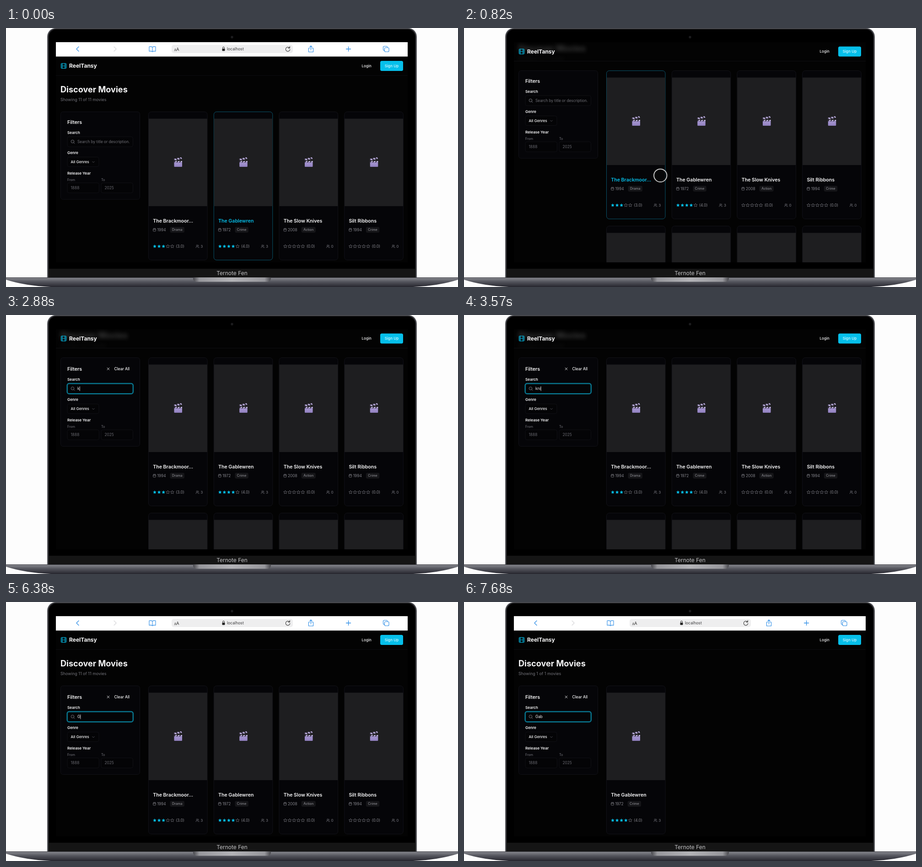
Recreate the animation shown at these times as an HTML page with a canvas. Size 988 by 567 pixels, loop 8 s.

```html
<!DOCTYPE html>
<html lang="en">
<head>
<meta charset="utf-8">
<title>Movie search</title>
<style>
html, body { margin: 0; width: 100%; height: 100%; overflow: hidden; background: #fdfdfd; }
canvas { display: block; }
</style>
</head>
<body>
<canvas id="stage" width="988" height="567"></canvas>
<script>
const ctx = document.getElementById('stage').getContext('2d');
const LOOP = 8000;
const CYAN = '#06bfea', BLUE = '#2f8ee6', WHITE = '#f7f7f8', GREY = '#7d7d84', DIM = '#5c5c63';
const SCREEN = { x: 109, y: 31, w: 769, h: 482 };

const MOVIES = [
  { title: 'The Brackmoor…', year: 1994, genre: 'Drama', stars: 3, votes: 3 },
  { title: 'The Gablewren', year: 1972, genre: 'Crime', stars: 4, votes: 3 },
  { title: 'The Slow Knives', year: 2008, genre: 'Action', stars: 0, votes: 0 },
  { title: 'Silt Ribbons', year: 1994, genre: 'Crime', stars: 0, votes: 0 }
];

// Timeline: [start, value] steps, the last one reached applies.
const TYPED = [[0, ''], [2880, 'k'], [3090, 'kn'], [3260, 'kni'], [5010, 'kn'], [5180, 'k'],
  [5350, ''], [6340, 'G'], [6860, 'Ga'], [7060, 'Gab']];
const CARET = [[0, 0], [1440, 1], [1990, 0], [2500, 1], [3790, 0], [5350, 1], [5900, 0], [6340, 1], [7570, 0]];
const FOUND = [[0, -1], [3600, 2], [5660, -1], [7340, 1]];
const POINTER = [[0, 468, 331], [200, 462, 330], [580, 437, 328], [860, 428, 322], [1230, 236, 163], [1500, 240, 163]];

const clamp = v => Math.max(0, Math.min(1, v));
const smooth = p => p * p * (3 - 2 * p);
const stepAt = (list, t) => list.filter(s => s[0] <= t).pop()[1];

function pointerAt(t) {
  const i = POINTER.findIndex(p => p[0] > t);
  if (i < 0) return POINTER[POINTER.length - 1].slice(1);
  const [t0, x0, y0] = POINTER[i - 1], [t1, x1, y1] = POINTER[i];
  const p = (t - t0) / (t1 - t0), k = t0 === 860 ? smooth(p) : p;
  return [x0 + (x1 - x0) * k, y0 + (y1 - y0) * k];
}

function scrollAt(t) {
  if (t < 3600) return 90 * smooth(clamp((t - 371) / 449));
  return 90 * Math.pow(1 - clamp((t - 3600) / 360), 3);
}

// y is the middle of the capitals.
function text(str, x, y, size, color, weight = 400, align = 'left') {
  ctx.font = `${weight} ${size}px Inter, sans-serif`;
  ctx.textAlign = align;
  ctx.fillStyle = color;
  ctx.fillText(str, x, y + size * 0.36);
  return ctx.measureText(str).width;
}

function box(x, y, w, h, r, fill, stroke, width = 1) {
  ctx.beginPath();
  ctx.roundRect(x, y, w, h, r);
  if (fill) { ctx.fillStyle = fill; ctx.fill(); }
  if (stroke) { ctx.strokeStyle = stroke; ctx.lineWidth = width; ctx.stroke(); }
}

function path(d, x, y, color, width = 1, fill) {
  ctx.save();
  ctx.translate(x, y);
  const p = new Path2D(d);
  ctx.lineCap = ctx.lineJoin = 'round';
  ctx.lineWidth = width;
  if (fill) { ctx.fillStyle = fill; ctx.fill(p); }
  if (color) { ctx.strokeStyle = color; ctx.stroke(p); }
  ctx.restore();
}

function gradient(x0, y0, x1, y1, stops) {
  const g = ctx.createLinearGradient(x0, y0, x1, y1);
  stops.forEach(([p, c]) => g.addColorStop(p, c));
  return g;
}

function clipTo(x, y, w, h, draw) {
  ctx.save();
  ctx.beginPath();
  ctx.rect(x, y, w, h);
  ctx.clip();
  draw();
  ctx.restore();
}

function laptop() {
  ctx.fillStyle = '#fdfdfd';
  ctx.fillRect(0, 0, 988, 567);
  box(90, 0, 808, 550, [19, 19, 0, 0], '#55565b');
  box(92, 1.5, 804, 548, [17, 17, 0, 0], '#29292c');
  box(93.5, 3, 801, 546, [16, 16, 0, 0], '#000');
  ctx.fillStyle = '#151515';
  ctx.fillRect(93.5, 527, 801, 20);
  ctx.beginPath();
  ctx.arc(494, 20, 2.7, 0, 7);
  ctx.fillStyle = '#1c1c1e';
  ctx.fill();
  text('Ternote Fen', 494, 537, 12, '#c3c3c5', 400, 'center');

  const body = gradient(0, 546, 0, 567, [[0, '#85868c'], [0.2, '#73747b'], [0.45, '#54555d'], [1, '#26262e']]);
  path('M0 546H988V551Q948 564 890 567H98Q40 564 0 551Z', 0, 0, null, 0, body);
  ctx.fillStyle = '#3b3b41';
  ctx.fillRect(0, 546, 988, 1);
  box(409, 546, 170, 9.5, [0, 0, 7, 7],
    gradient(409, 0, 579, 0, [[0, '#47474c'], [0.08, '#97979c'], [0.5, '#b3b3b7'], [0.92, '#97979c'], [1, '#47474c']]));
}

function browserBar(dy) {
  const y = 46 - dy;
  ctx.fillStyle = '#fff';
  ctx.fillRect(109, 31 - dy, 769, 31.5);
  path('M2.5 -5L-2.5 0L2.5 5', 156.5, y, BLUE, 1.3);
  path('M-2.5 -5L2.5 0L-2.5 5', 238.5, y, '#d5d5d8', 1.1);
  path('M0 -4Q-3 -6 -7 -5V5Q-3 4 0 6Q3 4 7 5V-5Q3 -6 0 -4V6', 320, y, BLUE, 1.1);
  box(362, 37 - dy, 265, 18, 5, '#eeeeef');
  text('A', 367.5, y + 2, 7, '#333', 400);
  text('A', 372, y + 1, 9.5, '#333', 400);
  box(472.5, y - 0.8, 6, 5, 1, '#222');
  path('M-1.8 0V-2A1.8 1.8 0 0 1 1.8 -2V0', 475.5, y - 0.8, '#222', 1);
  text('localhost', 483, y, 8.6, '#3a3a3c');
  path('M3.8 -2.7A4.7 4.7 0 1 0 4.7 .8M4.3 -6V-2.4H.8', 616, y + 0.3, '#333', 1.1);
  path('M-2 -2H-5V6.5H5V-2H2M0 2.5V-7M-2.6 -4.4L0 -7L2.6 -4.4', 666.5, y, BLUE, 1.1);
  path('M-5 0H5M0 -5V5', 748.5, y, BLUE, 1.3);
  box(824.5, y - 6, 9, 9, 2, null, BLUE, 1.1);
  box(827.5, y - 3, 9.5, 9, 2, '#fff', BLUE, 1.1);
}

function heading(y, count) {
  text('Discover Movies', 119, 134 - y, 18.1, WHITE, 700);
  text(`Showing ${count} of ${count} movies`, 119, 157 - y, 9, '#74747b');
}

function header(dy, scroll, count) {
  const top = 62.5 - dy;
  clipTo(109, top, 769, 41.5, () => {
    ctx.fillStyle = '#030303';
    ctx.fillRect(109, top, 769, 42);
    ctx.save();
    ctx.filter = 'blur(5px)';
    ctx.globalAlpha = 0.24;
    heading(scroll, count);
    ctx.restore();
  });
  ctx.fillStyle = '#0f0f12';
  ctx.fillRect(109, top + 41, 769, 1);
  const y = top + 20.5;
  box(120.5, y - 5.5, 11, 11, 1.5, null, CYAN, 1.1);
  path('M-2.7 -5.5V5.5M2.7 -5.5V5.5M-5.5 0H5.5M-5.5 -2.8H-2.7M-5.5 2.8H-2.7M5.5 -2.8H2.7M5.5 2.8H2.7', 126, y, CYAN, 0.9);
  text('ReelTansy', 138, y, 12, WHITE, 700);
  text('Login', 777.5, y, 8.1, WHITE, 500);
  box(818, y - 11, 50, 22, 3.5, CYAN);
  text('Sign Up', 843, y, 8.1, '#dcf7fd', 500, 'center');
}

function filters(scroll, typed, focus, caret) {
  const shift = typed ? 2.3 : 0, edge = '#101015';
  const y = v => v - scroll + shift;
  box(119.5, 183.5 - scroll, 173, 191.7 + shift, 5, '#050508', '#111117');
  text('Filters', 134, y(206.5) - shift * 0.35, 10.7, WHITE, 600);
  if (typed) {
    path('M-2.4 -2.4L2.4 2.4M2.4 -2.4L-2.4 2.4', 223.5, y(205.6), WHITE, 0.9);
    text('Clear All', 236.5, y(205.6), 8.4, WHITE, 500);
  }
  text('Search', 134, y(228.6), 8.2, WHITE, 600);
  box(134, y(238), 143.5, 22, 4, '#040406', edge);
  if (focus > 0) {
    ctx.globalAlpha = focus;
    box(133.6, y(237.6), 144.3, 22.6, 4.5, null, '#064453', 3);
    box(133.8, y(237.8), 143.9, 22.2, 4, null, '#0a8fae', 1.3);
    ctx.globalAlpha = 1;
  }
  path('M2 2L4 4M2.8 -.6A3.3 3.3 0 1 1 -3.8 -.6A3.3 3.3 0 1 1 2.8 -.6', 146, y(249), GREY, 0.9);
  let end = 156;
  clipTo(155, y(240), 115, 18, () => {
    if (typed) end += text(typed, 156, y(249), 8.3, WHITE);
    else text('Search by title or description...', 156, y(249), 8.25, '#707077');
  });
  if (caret) {
    ctx.fillStyle = '#e4e4e6';
    ctx.fillRect(end + 0.2, y(244), 0.9, 10);
  }
  text('Genre', 134, y(273.2), 8.2, WHITE, 600);
  box(134, y(282.5), 69, 21, 4, '#040406', edge);
  text('All Genres', 141.5, y(293.2), 8.2, WHITE, 500);
  path('M-2.3 -1.2L0 1.2L2.3 -1.2', 191, y(293.4), '#55555b', 0.9);
  text('Release Year', 134, y(317.7), 8.2, WHITE, 600);
  [[134, 'From', '1888'], [208, 'To', '2025']].forEach(([x, label, year]) => {
    text(label, x, y(332.2), 7.1, '#7a7a81');
    box(x, y(339), 69.5, 22, 4, '#040406', edge);
    text(year, x + 7.5, y(350), 8.3, '#696970');
  });
}

function star(x, y, full) {
  ctx.beginPath();
  for (let i = 0; i < 10; i++) {
    const r = i % 2 ? 1.9 : 4, a = i * Math.PI / 5 - Math.PI / 2;
    ctx.lineTo(x + r * Math.cos(a), y + r * Math.sin(a));
  }
  ctx.closePath();
  ctx.lineWidth = 0.8;
  ctx.lineJoin = 'round';
  ctx.fillStyle = ctx.strokeStyle = full ? CYAN : '#73737a';
  if (full) ctx.fill();
  else ctx.stroke();
}

function clapper(x, y) {
  box(x - 8.5, y - 1.5, 17.5, 12, 1.2, gradient(0, y - 2, 0, y + 11, [[0, '#8474ae'], [0.4, '#a393cf'], [1, '#8d7cbb']]));
  ctx.fillStyle = '#393345';
  ctx.fillRect(x - 8.5, y - 2.5, 17.5, 3.2);
  path('M-7 0L-5 -3H-2L-4 0ZM-1 0L1 -3H4L2 0ZM5 0L7 -3H9V0Z', x, y + 0.6, null, 0, '#c3b8df');
  ctx.save();
  ctx.translate(x - 8.8, y - 3.2);
  ctx.rotate(-0.23);
  ctx.fillStyle = '#3b3547';
  ctx.fillRect(0, -3.6, 18, 3.8);
  path('M1 -3.6H4.5L6.5 .2H3ZM7.5 -3.6H11L13 .2H9.5ZM14 -3.6H17L18 0V.2H16Z', 0, 0, null, 0, '#baaedb');
  ctx.restore();
}

function card(m, x, y, hover) {
  box(x, y, 128.5, 324.5, 6, '#050508', hover ? '#09536a' : '#121218');
  ctx.fillStyle = '#1e1e20';
  ctx.fillRect(x + 0.3, y + 15, 128, 191.5);
  clapper(x + 64.5, y + 110);
  const left = x + 9.7;
  text(m.title, left, y + 239, 10.6, hover ? CYAN : WHITE, 600);

  const my = y + 258.3;
  box(left + 0.4, my - 2.5, 5.8, 5.8, 1, null, GREY, 0.8);
  path('M0 0H5.8M1.5 -3V-1.4M4.3 -3V-1.4', left + 0.4, my - 0.7, GREY, 0.8);
  const badge = left + 9.3 + text(m.year, left + 9.3, my, 8.3, '#85858c') + 9;
  ctx.font = '500 7.2px Inter, sans-serif';
  box(badge, my - 6.3, ctx.measureText(m.genre).width + 9, 12.6, 3, '#151518');
  text(m.genre, badge + 4.5, my, 7.2, '#88888e', 500);

  const sy = y + 294.5;
  for (let i = 0; i < 5; i++) star(left + 3.8 + i * 9.6, sy, i < m.stars);
  text(`(${m.stars}.0)`, left + 50, sy, 8.4, '#8a8a90');
  text(m.votes, x + 118.7, sy + 0.3, 8.2, GREY, 400, 'right');
  path('M-3.3 3V2.2Q-3.3 .6 -1 .6Q1.4 .6 1.4 2.2V3M.6 -1.7A1.5 1.5 0 1 1 -2.4 -1.7A1.5 1.5 0 1 1 .6 -1.7M1.8 -3.1Q3.6 -1.7 1.8 -.3M2.4 .9Q3.6 1.4 3.6 3',
    x + 107, sy, GREY, 0.7);
}

function cards(scroll, found, px, py) {
  const cell = (m, i, row) => {
    const x = 311.5 + i * 142.75, y = 183.5 + row * 340 - scroll;
    card(m, x, y, px >= x && px <= x + 128.5 && py >= y && py <= y + 325);
  };
  if (found >= 0) return cell(MOVIES[found], 0, 0);
  [0, 1].forEach(row => MOVIES.forEach((m, i) => cell(m, i, row)));
}

function draw(t) {
  const scroll = scrollAt(t), dy = Math.min(31.5, scroll * 0.469);
  const found = stepAt(FOUND, t), count = found < 0 ? 11 : 1;
  const [px, py] = pointerAt(t);
  laptop();
  clipTo(SCREEN.x, SCREEN.y, SCREEN.w, SCREEN.h, () => {
    ctx.fillStyle = '#030303';
    ctx.fillRect(SCREEN.x, SCREEN.y, SCREEN.w, SCREEN.h);
    heading(scroll, count);
    filters(scroll, stepAt(TYPED, t), clamp((t - 1440) / 130), stepAt(CARET, t));
    cards(scroll, found, px, py);
    header(dy, scroll, count);
    browserBar(dy);
    if (t >= 120 && t < 2880) {
      ctx.beginPath();
      ctx.arc(px, py, 14.2, 0, 7);
      ctx.fillStyle = 'rgba(8,8,8,.6)';
      ctx.fill();
      ctx.lineWidth = 2;
      ctx.strokeStyle = '#c4c4c4';
      ctx.stroke();
    }
  });
}

const start = performance.now();
function tick() {
  draw((performance.now() - start) % LOOP);
  requestAnimationFrame(tick);
}
draw(0);
requestAnimationFrame(tick);
</script>
</body>
</html>
```
